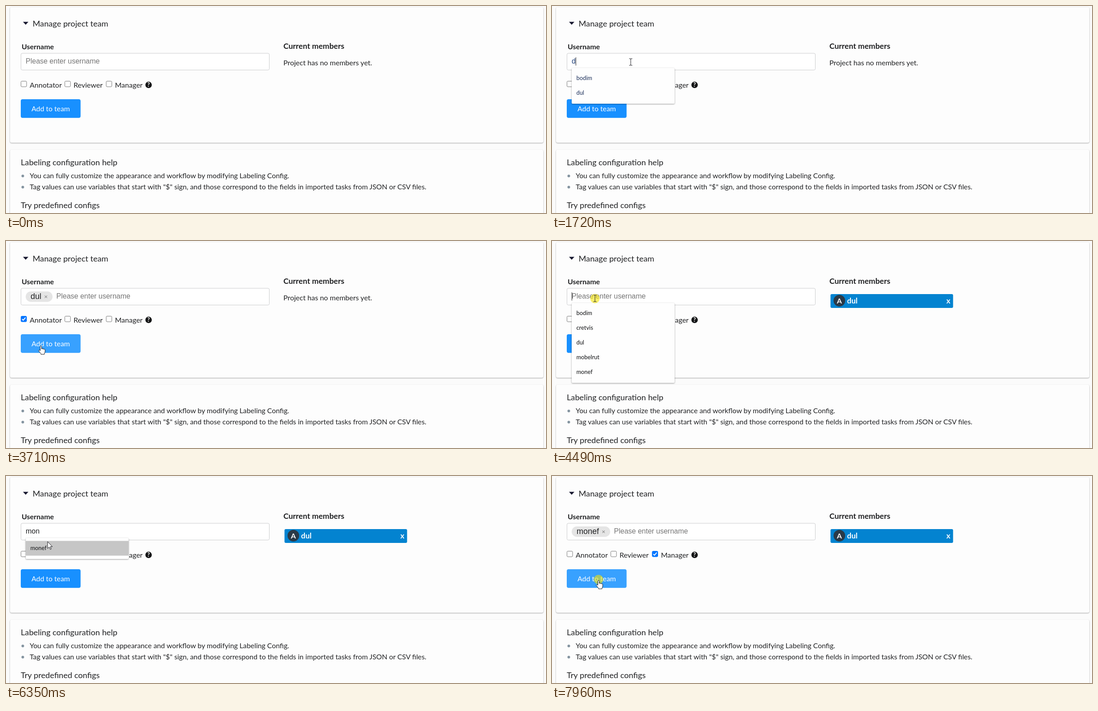
These frames come from a looping animation (1207x464 px, 8 s). An HTML page:

```html
<!DOCTYPE html>
<html lang="en">
<head>
<meta charset="utf-8">
<title>Manage project team</title>
<style>
  html, body { margin: 0; width: 100%; height: 100%; overflow: hidden; background: #fbfbfb; }
  svg { display: block; width: 1207px; height: 464px; font: 16px Lato, sans-serif; fill: #212224; }
  text { white-space: pre; }
  .h { font-size: 18.2px; }
  .p { font-size: 15.82px; }
  .b { font-weight: 700; }
  .input { font-family: "Liberation Sans", Arial, sans-serif; }
  .card { fill: #fdfdfd; filter: drop-shadow(0 1px 1.2px rgba(0, 0, 0, .36)); }
  .field { fill: #fff; stroke: #cacbcd; }
  .hint { fill: #757575; }
  .bullet { fill: #8494a0; }
  .white { fill: #fff; }
  .popup { fill: #fefefe; filter: drop-shadow(0 1px 1.5px rgba(0, 0, 0, .4)); }
  .item { font-size: 12.8px; font-weight: 500; }
  .box { fill: #fff; stroke: #767676; }
  .box + path { fill: none; stroke: #fff; stroke-width: 2; visibility: hidden; }
  .on .box { fill: #0075ff; stroke: #0075ff; }
  .on .box + path { visibility: visible; }
  #button { fill: #1890ff; }
  #button.hover { fill: #38a1ff; }
  #pointer path { fill: #fff; stroke: #16161c; stroke-linejoin: round; }
</style>
</head>
<body>
<svg viewBox="0 0 1207 464">
  <rect class="card" x="9" y="2.5" width="1192" height="304" rx="4"/>
  <rect class="card" x="9" y="322" width="1192" height="170" rx="4"/>

  <path d="M38 35.5h12l-6 6.5z" fill="#15162e"/>
  <text class="h" x="59.5" y="46.3">Manage project team</text>
  <text class="b" x="35" y="96.5">Username</text>
  <text class="b" x="620" y="96" font-size="17.5">Current members</text>
  <text id="empty" x="620" y="132.5">Project has no members yet.</text>

  <g id="member">
    <rect x="622.5" y="119" width="274" height="31" rx="3" fill="#0383d0"/>
    <circle cx="642.3" cy="133.7" r="13" fill="#2a3a48"/>
    <text class="b white" x="642.3" y="139.6" text-anchor="middle">A</text>
    <text class="b white" x="659.5" y="139.8" font-size="17">dul</text>
    <text class="b white" x="881.5" y="139.5" font-size="17">x</text>
  </g>

  <rect class="field" x="33.5" y="106" width="555" height="37.5" rx="3"/>
  <g id="chip">
    <rect x="44" y="113" height="23.5" rx="11.75" fill="#e5e5e5"/>
    <text class="input" x="55" y="130" font-size="18"></text>
    <path d="M-2.7-2.7l5.4 5.4m0-5.4l-5.4 5.4" stroke="#8b8b8b" stroke-width="1.2"/>
  </g>
  <text id="hint" class="input hint" y="129">Please enter username</text>
  <text id="typed" class="input" x="44" y="129"></text>
  <rect id="caret" y="115" width="1" height="18.5"/>

  <g id="roles"></g>
  <circle cx="318.7" cy="176.8" r="7.2" fill="#151617"/>
  <text class="b white" x="318.7" y="181.2" font-size="12.5" text-anchor="middle">?</text>

  <rect id="button" x="33" y="209" width="133.7" height="41.7" rx="4"/>
  <text class="white p" x="57" y="236">Add to team</text>

  <text class="h" x="33" y="357">Labeling configuration help</text>
  <circle class="bullet" cx="37.5" cy="381" r="3"/>
  <text class="p" x="53" y="386">You can fully customize the appearance and workflow by modifying Labeling Config.</text>
  <circle class="bullet" cx="37.5" cy="406" r="3"/>
  <text class="p" x="53" y="411">Tag values can use variables that start with "$" sign, and those correspond to the fields in imported tasks from JSON or CSV files.</text>
  <text class="h" x="33" y="453">Try predefined configs</text>

  <g id="popup">
    <rect class="popup" x="44" y="139" width="230" rx="2"/>
    <rect id="row" x="44" y="145.5" width="230" height="33" fill="#c6c6c6"/>
    <g id="items"></g>
  </g>

  <circle id="halo" r="10.5" fill="#f5e400" opacity=".58"/>
  <g id="pointer">
    <path id="arrow" d="M0 0V15.5L3.6 12.2L6 17.6L8.2 16.6L5.9 11.4H10.6Z"/>
    <path id="hand" d="M-1.5 11V1.5a1.5 1.5 0 0 1 3 0V7a1.4 1.4 0 0 1 2.8 .4a1.4 1.4 0 0 1 2.6 .7a1.3 1.3 0 0 1 2.4 .8V13q0 2-1.5 4V19H0V17.5L-4.8 11.5a1.4 1.4 0 0 1 2-1.8z"/>
    <path id="beam" style="fill:none" d="M-3.5-7h2.5l1 1l1-1h2.5M0-6V7M-3.5 8h2.5l1-1l1 1h2.5"/>
  </g>
</svg>
<script>
const LOOP = 8000, STEP = 70;
const $ = id => document.getElementById(id);
const names = ['bodim', 'cretvis', 'dul', 'mobelrut', 'monef'];

// Each entry holds until the next: time, typed text, popup open, chip name
const input = [
  [0, '', false, ''],
  [1120, '', true, ''],
  [1650, 'd', true, ''],
  [1990, 'du', true, ''],
  [2120, '', false, 'dul'],
  [3850, '', false, ''],
  [4490, '', true, ''],
  [5220, 'm', true, ''],
  [5350, 'mo', true, ''],
  [5550, 'mon', true, ''],
  [6490, '', false, 'monef']
];

// Pointer stops: time, x, y
const stops = [
  [500, 520, 378], [1060, 176, 125],
  [2730, 176, 125], [3010, 83, 167], [3150, 39, 172],
  [3290, 39, 172], [3570, 78, 235],
  [3850, 78, 235], [4270, 96, 128],
  [6210, 96, 128], [6350, 93, 147],
  [6490, 93, 147], [6910, 231, 172],
  [7190, 231, 172], [7820, 104, 234]
];

const halos = [[1060, 1190], [3150, 3290], [3780, 3850], [4490, 4620], [6420, 6560], [6910, 7060], [7960, 8000]];
const carets = [[1120, 2650], [4490, 5020], [5220, 6080], [6490, 7260]];

const within = (spans, t) => spans.some(([a, b]) => t >= a && t < b);
const show = (el, on) => { el.style.display = on ? '' : 'none'; };
const place = (el, x, y) => el.setAttribute('transform', `translate(${x} ${y})`);

$('roles').innerHTML = [['Annotator', 33], ['Reviewer', 131], ['Manager', 223.5]].map(([name, x]) => `
  <g transform="translate(${x} 168)">
    <rect class="box" x=".5" y=".5" width="12.5" height="12.5" rx="2"/>
    <path d="M3 7l2.6 2.6L10.6 3.6"/>
    <text x="20" y="15">${name}</text>
  </g>`).join('');
const [annotator, , manager] = $('roles').children;

const [chipBox, chipText, chipCross] = $('chip').children;
const popupBox = $('popup').firstElementChild;

function pointerAt(t) {
  const i = stops.findLastIndex(s => s[0] <= t);
  if (i < 0) return null;
  const [t0, x0, y0] = stops[i];
  const [t1, x1, y1] = stops[i + 1] || [t0 + LOOP, x0, y0];
  const u = Math.floor((t - t0) / STEP) * STEP / (t1 - t0);
  const k = u * u * (3 - 2 * u);
  return [x0 + (x1 - x0) * k, y0 + (y1 - y0) * k];
}

let shown;
function drawInput(state, t) {
  const [, typed, open, name] = state;
  const hits = names.filter(n => n.includes(typed));
  const tinted = typed && t < 2120;

  $('typed').textContent = typed;
  $('typed').style.fill = tinted ? '#2b4a80' : '';
  show($('hint'), !typed);
  show($('chip'), name);
  chipText.textContent = name;

  let start = 44;
  if (name) {
    const end = 55 + chipText.getComputedTextLength();
    chipBox.setAttribute('width', end + 25 - 44);
    place(chipCross, end + 10.2, 125);
    start = end + 33.5;
  }
  $('hint').setAttribute('x', start);
  $('caret').setAttribute('x', typed ? 44 + $('typed').getComputedTextLength() : start);

  show($('popup'), open);
  popupBox.setAttribute('height', 14 + 33 * hits.length);
  $('items').innerHTML = hits.map((n, i) =>
    `<text class="item" x="54.5" y="${166.4 + 33 * i}">${n}</text>`).join('');
  $('items').style.fill = tinted ? '#2c3e66' : '';
}

function drawPointer(t) {
  const p = pointerAt(t);
  show($('pointer'), p);
  show($('halo'), p && within(halos, t));
  let shape = 'arrow';
  if (p) {
    const [x, y] = p;
    if (x > 33 && x < 589 && y > 106 && y < 143) shape = 'beam';
    if (x > 33 && x < 167 && y > 210 && y < 251) shape = 'hand';
    place($('pointer'), x, y);
    place($('halo'), x, shape === 'hand' ? y - 2 : y + 1);
  }
  for (const id of ['arrow', 'hand', 'beam']) show($(id), id === shape);
  $('button').classList.toggle('hover', shape === 'hand');
}

function draw(t) {
  const state = input.findLast(s => s[0] <= t);
  if (state !== shown) drawInput(shown = state, t);
  show($('caret'), within(carets, t));
  show($('row'), t >= 6350 && t < 6490);
  show($('empty'), t < 3850);
  show($('member'), t >= 3850);
  annotator.classList.toggle('on', t >= 3220 && t < 3850);
  manager.classList.toggle('on', t >= 6980);
  drawPointer(t);
}

const begin = performance.now();
function tick() {
  draw((performance.now() - begin) % LOOP);
  requestAnimationFrame(tick);
}
tick();
</script>
</body>
</html>
```
